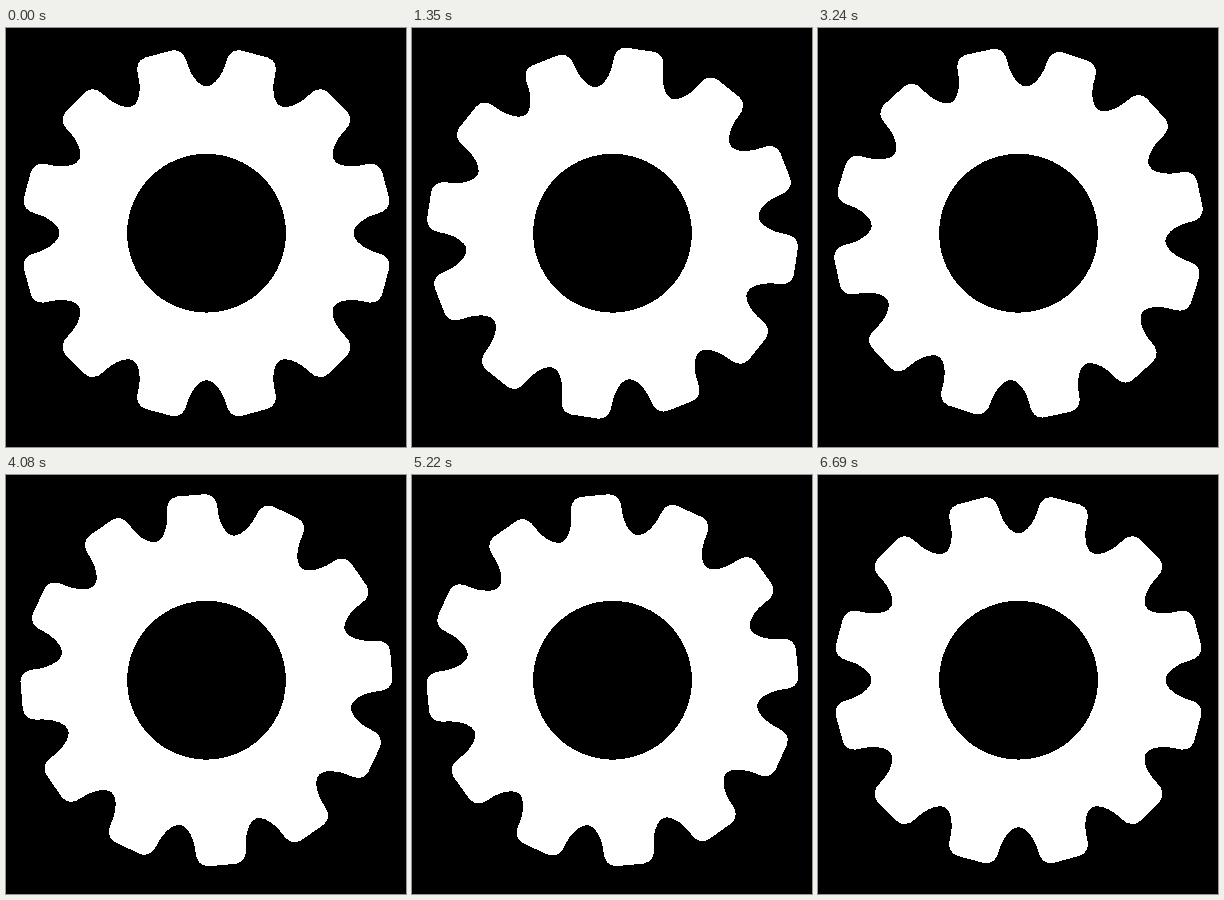
Recreate the animation shown at these times as an HTML page. Size 400 by 419 pixels, loop 6.72 s.

```html
<!DOCTYPE html>
<html lang="en">
<head>
<meta charset="utf-8">
<title>Turning gear</title>
<style>
  html, body { margin: 0; width: 100%; height: 100%; overflow: hidden; background: #000; }
  svg { display: block; width: 400px; height: 419px; }
</style>
</head>
<body>
<svg viewBox="0 0 400 419" shape-rendering="crispEdges">
  <g id="gear">
    <path id="rim" fill="#fff"/>
    <circle cx="200.5" cy="205.2" r="79.4" fill="#000"/>
  </g>
</svg>
<script>
const CX = 200.5, CY = 205.2;
const TEETH = 12;
const STEP_MS = 30, STEPS = 224;
const TURN = -180;

// Half of one tooth, from valley to tip: [distance from hub, offset from tooth axis]
const HALF = [
  [142, 38.05], [144, 30.3], [158, 25.3], [170, 25.3],
  [179, 25.3], [184.5, 22], [185.5, 14]
];

function place([u, v], angle) {
  const s = Math.sin(angle), c = Math.cos(angle);
  const x = CX + u * s + v * c;
  const y = CY - u * c + v * s;
  return x.toFixed(2) + ' ' + y.toFixed(2);
}

function gearPath() {
  let d = '';
  for (let i = 0; i < TEETH; i++) {
    const angle = (i + 0.5) * 2 * Math.PI / TEETH;
    const left = HALF.map(([u, v]) => place([u, -v], angle));
    const right = HALF.map(p => place(p, angle)).reverse();
    d += (i ? 'L' : 'M') + left[0] + 'C' + left.slice(1).join(' ');
    d += 'L' + right[0] + 'C' + right.slice(1).join(' ');
  }
  return d + 'Z';
}

const gear = document.getElementById('gear');
document.getElementById('rim').setAttribute('d', gearPath());

const start = performance.now();
function draw(now) {
  const step = Math.floor(Math.max(0, now - start) / STEP_MS) % STEPS;
  const angle = TURN * step / (STEPS - 1);
  gear.setAttribute('transform', `rotate(${angle} ${CX} ${CY})`);
  requestAnimationFrame(draw);
}
draw(start);
</script>
</body>
</html>
```
